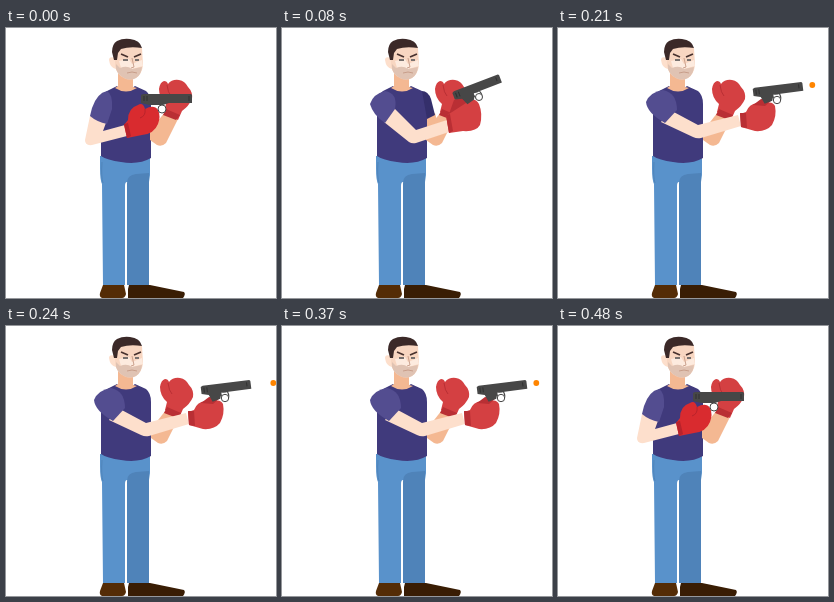
Recreate the animation shown at these times as an HTML page. Size 270 by 270 pixels, loop 0.56 s.

```html
<!DOCTYPE html>
<html lang="en">
<head>
<meta charset="utf-8">
<title>Boxer with a pistol</title>
<style>
html, body { margin: 0; width: 100%; height: 100%; overflow: hidden; background: #fff; }
svg { display: block; width: 100vw; height: 100vh; }
.pose, .shot { animation: 560ms step-end infinite; }
.rest { animation-name: rest; }
.raise { animation-name: raise; }
.aim { animation-name: aim; }
.shot { animation-name: shot; }
@keyframes rest { 0%, 85.714% { visibility: visible } 14.286% { visibility: hidden } }
@keyframes raise { 0%, 28.571%, 85.714% { visibility: hidden } 14.286%, 71.429% { visibility: visible } }
@keyframes aim { 0%, 71.429% { visibility: hidden } 28.571% { visibility: visible } }
@keyframes shot { 0%, 57.143% { transform: none } 42.857% { transform: translateX(13px) } }
.skin { fill: #fddfcc; }
.shade { fill: #f4b892; }
.shirt { fill: #403a7c; }
.sleeve { fill: #534d90; }
.glove { fill: #d44042; }
.cuff { fill: #b92f34; }
.rest .glove { fill: #d92b2f; }
.rest .cuff { fill: #b9232b; }
.gun { fill: #474747; }
</style>
</head>
<body>
<svg viewBox="0 0 270 270">
  <defs>
    <g id="far">
      <path class="shade" d="M145 103L160 84L173 91L161 115Q157 119 152 117L145 112Z"/>
      <path class="glove" d="M159 84L161 76Q154 70 154 61Q155 54 159 53Q162 53 163 56Q167 51 174 52Q180 53 183 59Q188 64 187 71Q184 78 177 83L173 92Z"/>
      <path class="cuff" d="M161 81L175 87L171 92L158 87Z"/>
      <path d="M162 57Q163 65 166 68" fill="none" stroke="#b92f34"/>
    </g>
    <g id="pistol">
      <path class="gun" d="M0 1L2 0H49L50 1V9H27Q23 10 20 9L18 15L10 17L7 10L0 8Z"/>
      <path d="M3 2V7M6 2V7M46 2V6" stroke="#303030"/>
      <path d="M19 10Q20 18 25 17Q28 14 26 9" fill="none" stroke="#474747" stroke-width="1.2"/>
    </g>
  </defs>

  <!-- legs and shoes -->
  <path fill="#5992cb" d="M94 128H144V147L143 154H121Q119 154 119 158V257H97L96 156Q94 152 94 140Z"/>
  <path fill="#4f83b9" d="M143 145V257H121V155Q121 147 130 146Z"/>
  <path d="M96 134Q95 149 97 155" fill="none" stroke="#4c80b5" stroke-width=".8"/>
  <path fill="#542c06" d="M97 257H118L120 266Q119 270 116 270H96Q93 269 94 265Z"/>
  <path fill="#391d04" d="M123 257H144L178 264Q180 266 177 270H122V261Z"/>

  <!-- head and torso -->
  <path class="shirt" d="M111 58Q119 66 129 58L140 63Q145 67 145 76V130Q133 137 115 134Q101 132 95 128V77Q95 67 101 63Z"/>
  <path class="shade" d="M112 44H127V59L131 60Q120 67 109 60L112 58Z"/>
  <path class="skin" d="M109 30Q103 28 103 32Q104 40 110 41Z"/>
  <path fill="#f8d6c1" d="M109 20Q122 13 136 20L137 37Q136 46 130 50Q124 53 118 50Q111 47 109 38Z"/>
  <path fill="#fdebdf" d="M113 33L123 31L126 36L136 32L137 38L126 41L115 40Z"/>
  <path fill="#e0c3b3" d="M110 36L114 40Q121 37 126 41L136 39Q135 47 130 50Q124 53 118 50Q112 47 110 41Z"/>
  <path fill="#3b2928" d="M108 32L106 24Q106 16 111 13Q117 10 124 11Q134 12 136 20Q124 18 115 21L112 25L111 32Z"/>
  <path d="M115 26L122 29M128 29L135 26" stroke="#47312e" stroke-width="1.7"/>
  <path d="M117 32H122M129 32H133" stroke="#77716f" stroke-width="1.8"/>
  <path d="M126 30L128 39L125 40M121 45Q126 43 131 45" fill="none" stroke="#c69a86" stroke-width=".9"/>

  <g class="pose rest">
    <use href="#far" x="-1"/>
    <path class="skin" d="M84 88L101 92L97 103L119 97L121 108L86 117Q79 118 79 112Z"/>
    <path class="sleeve" d="M101 63Q91 65 86 80L84 88Q91 94 101 96L106 81Q107 66 101 63Z"/>
    <path class="glove" d="M118 97L122 92Q122 80 132 77Q137 74 139 81Q148 76 152 82Q155 88 152 96Q148 106 136 107L121 110Z"/>
    <path class="cuff" d="M118 96L122 95L125 108L121 110Z"/>
    <path d="M139 81Q140 88 134 90" fill="none" stroke="#b9232b"/>
    <path class="gun" d="M135 67L137 66H185L186 67V75H163L157 77H143L135 75Z"/>
    <path d="M138 68V73M141 68V73M183 68V73" stroke="#303030"/>
    <circle cx="156" cy="81" r="4" fill="#fff" stroke="#474747"/>
  </g>

  <g class="pose raise">
    <path class="shade" d="M145 87L153 85L156 96L153 115L145 112Z"/>
    <path fill="#342f6b" d="M140 63Q146 63 149 71L153 87L145 91Z"/>
    <use href="#far" x="-1"/>
    <path class="skin" d="M102 94L112 80L134 102L165 92L167 104L134 115Q130 116 127 114Z"/>
    <path class="sleeve" d="M103 63Q91 66 88 76Q91 87 103 95L113 81Q116 65 103 63Z"/>
    <path class="glove" d="M164 88L169 84L172 70Q178 68 184 73Q193 69 197 76Q201 86 198 97Q194 104 181 103L167 105Z"/>
    <path class="cuff" d="M164 87L168 86L171 103L167 105ZM167 86L172 72L190 66L184 75Z"/>
    <use href="#pistol" transform="translate(170 64) rotate(-21)"/>
    <circle cx="197" cy="69" r="3.5" fill="#fff" stroke="#474747"/>
  </g>

  <g class="pose aim">
    <use href="#far"/>
    <path class="skin" d="M103 94L112 82L140 97L180 87L183 98L143 110Q139 111 135 109Z"/>
    <path class="sleeve" d="M105 62Q92 64 88 74Q89 85 107 95L119 82Q119 65 105 62Z"/>
    <path class="glove" d="M182 86L188 84Q191 76 199 75Q204 71 206 76Q214 72 217 78Q219 88 214 97Q208 104 197 103L183 99Z"/>
    <path class="cuff" d="M182 85L188 85L189 100L183 99ZM195 77L203 71L214 72L207 78Z"/>
    <use href="#pistol" transform="translate(194.6 60) rotate(-7)"/>
    <circle cx="219" cy="72" r="3.7" fill="#fff" stroke="#474747"/>
    <circle class="shot" cx="254.3" cy="57" r="2.9" fill="#ff8500"/>
  </g>
</svg>
</body>
</html>
```
